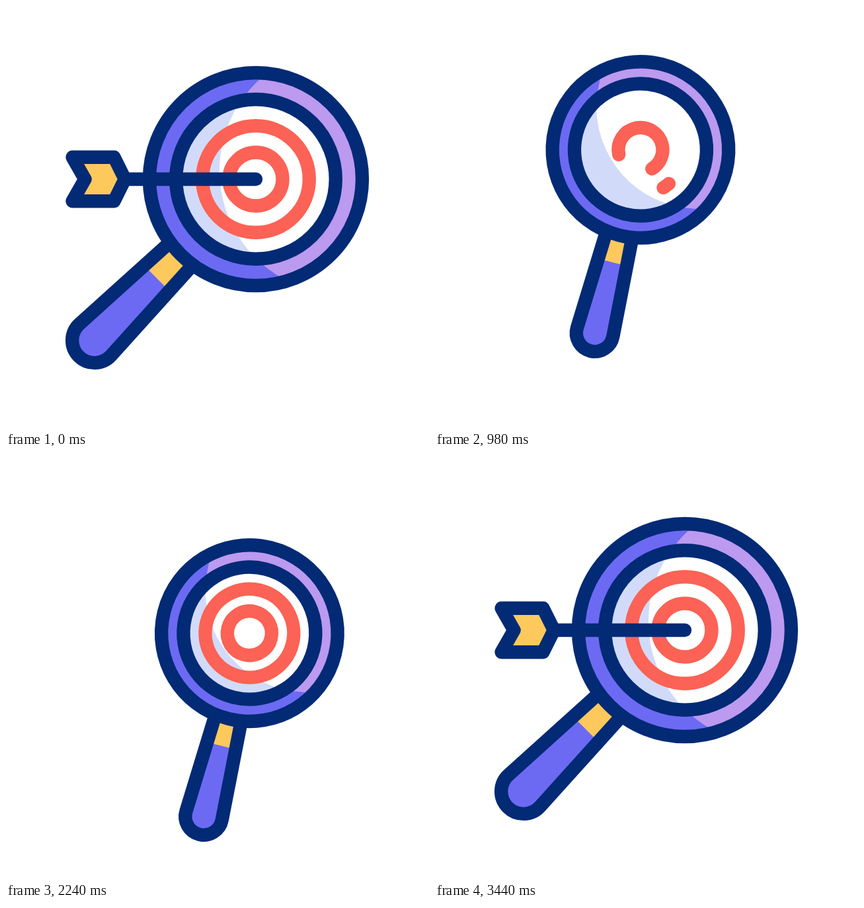
An HTML page with a canvas that plays this animation: 640x640 px, repeating every 3.6 s.

```html
<!DOCTYPE html>
<html lang="en">
<head>
<meta charset="utf-8">
<title>Magnifier and target</title>
<style>
  html, body { margin: 0; width: 100%; height: 100%; overflow: hidden; background: #fff; }
  canvas { display: block; width: 640px; height: 640px; }
</style>
</head>
<body>
<canvas id="stage" width="640" height="640"></canvas>
<script>
const ctx = document.getElementById('stage').getContext('2d');
const LOOP = 3600, TAU = Math.PI * 2, RAD = Math.PI / 180, LINE = 20.4;
const NAVY = '#032a75', PURPLE = '#6c6af2', LILAC = '#bb9af0', SHADE = '#d1dbf9',
      RED = '#fc6255', YELLOW = '#fdc95c', WHITE = '#fff';

// Lens centre: time, x, y
const PATH = [
  [200, 378, 262], [680, 347.5, 233], [740, 341, 221], [900, 319, 215],
  [1100, 303, 221], [1300, 304, 207], [1570, 345, 188], [1840, 379.5, 209],
  [2040, 384, 237], [2240, 368.5, 266.5], [2360, 356, 275], [2500, 341, 277.5],
  [2620, 333, 275.5], [2740, 332, 270.5], [2900, 345.5, 267], [3100, 374, 258.5],
  [3440, 378, 262]
];

// Target rings: radius, wipe start and end, redraw start and end
const RINGS = [
  [80.8, 347, 1047, 1170, 1770],
  [40.5, 726, 1426, 1430, 2030]
];

function ease(t, from, to) {
  const u = Math.min(1, Math.max(0, (t - from) / (to - from)));
  return u * u * (3 - 2 * u);
}

function slope(i, k) {
  const a = PATH[i - 1], b = PATH[i + 1];
  return a && b ? (b[k] - a[k]) / (b[0] - a[0]) : 0;
}

// Smooth curve through the path points
function along(t, k) {
  const last = PATH.length - 1;
  if (t <= PATH[0][0]) return PATH[0][k];
  if (t >= PATH[last][0]) return PATH[last][k];
  let i = 0;
  while (PATH[i + 1][0] < t) i++;
  const a = PATH[i], b = PATH[i + 1], d = b[0] - a[0], u = (t - a[0]) / d;
  const w = u * u * (3 - 2 * u);
  return a[k] + (b[k] - a[k]) * w +
    d * u * (1 - u) * ((1 - u) * slope(i, k) - u * slope(i + 1, k));
}

function place(x, y, turn, size) {
  const c = Math.cos(turn * RAD) * size, s = Math.sin(turn * RAD) * size;
  ctx.setTransform(c, s, -s, c, x, y);
}

// Line weight stays the same at every size
function stroke(path, size, color = NAVY) {
  ctx.lineWidth = LINE / size;
  ctx.strokeStyle = color;
  ctx.stroke(path);
}

function fill(path, color) {
  ctx.fillStyle = color;
  ctx.fill(path);
}

function disc(r, x = 0, y = 0) {
  const p = new Path2D();
  p.arc(x, y, r, 0, TAU);
  return p;
}

const OUTER = disc(161), INNER = disc(120.8), LIGHT = disc(187, 132, -13);
const HANDLE = new Path2D('M-23.8 150L-33.75 343.3A33.8 33.8 0 1 0 33.75 343.3L23.8 150Z');
const FLIGHT = new Path2D('M-138.5 -33.3H-75.5L-59 0L-75.5 33.3H-138.5L-119.5 0Z');
const SHAFT = new Path2D('M-59 0H139');

function shaded(shape, dark, light) {
  fill(shape, dark);
  ctx.save();
  ctx.clip(shape);
  fill(LIGHT, light);
  ctx.restore();
}

function ring(t, size, [r, wipe, gone, draw, done]) {
  const from = t < draw ? ease(t, wipe, gone) : 0;
  const to = t < draw ? 1 : ease(t, draw, done);
  if (to - from < 0.001) return;
  const p = new Path2D();
  p.arc(0, 0, r, TAU * (0.25 + from), TAU * (0.25 + to));
  stroke(p, size, RED);
}

function magnifier(t) {
  const x = along(t, 1), y = along(t, 2);
  const turn = -31 * (ease(t, 200, 871) - ease(t, 2556, 3149));
  const size = 1 - 0.172 * (ease(t, 200, 808) - ease(t, 2622, 3112));

  place(x, y, turn + 45, size);
  fill(HANDLE, PURPLE);
  ctx.save();
  ctx.clip(HANDLE);
  ctx.fillStyle = YELLOW;
  ctx.fillRect(-40, 140, 80, 72);
  ctx.restore();
  stroke(HANDLE, size);

  place(x, y, turn, size);
  shaded(OUTER, PURPLE, LILAC);
  stroke(OUTER, size);
  shaded(INNER, SHADE, WHITE);
  RINGS.forEach(r => ring(t, size, r));
  stroke(INNER, size);
}

function arrow(t) {
  let x = 239, y = 262, turn = 0;
  if (t < 1600) {
    const k = Math.max(0, t - 200) / 480;
    x += 15 * k ** 5.6;
    y += 181.5 * k ** 2.7;
    turn = -25.3 * k * k;
    if (y > 840) return;
  } else {
    const k = Math.max(0, 3440 - t) / 700;
    turn = -5.4 * k * k;
    // Tip position, then back to the middle of the arrow
    x = 378 - 320 * k ** 2.6 - 139 * Math.cos(turn * RAD);
    y = 262 - 2.5 * k * k - 139 * Math.sin(turn * RAD);
    if (x < -200) return;
  }
  place(x, y, turn, 1);
  stroke(SHAFT, 1);
  fill(FLIGHT, YELLOW);
  stroke(FLIGHT, 1);
}

function frame(now) {
  const t = now % LOOP;
  ctx.setTransform(1, 0, 0, 1, 0, 0);
  ctx.fillStyle = WHITE;
  ctx.fillRect(0, 0, 640, 640);
  ctx.lineCap = ctx.lineJoin = 'round';
  magnifier(t);
  arrow(t);
}

const start = performance.now();
function tick() {
  frame(performance.now() - start);
  requestAnimationFrame(tick);
}
tick();
</script>
</body>
</html>
```
